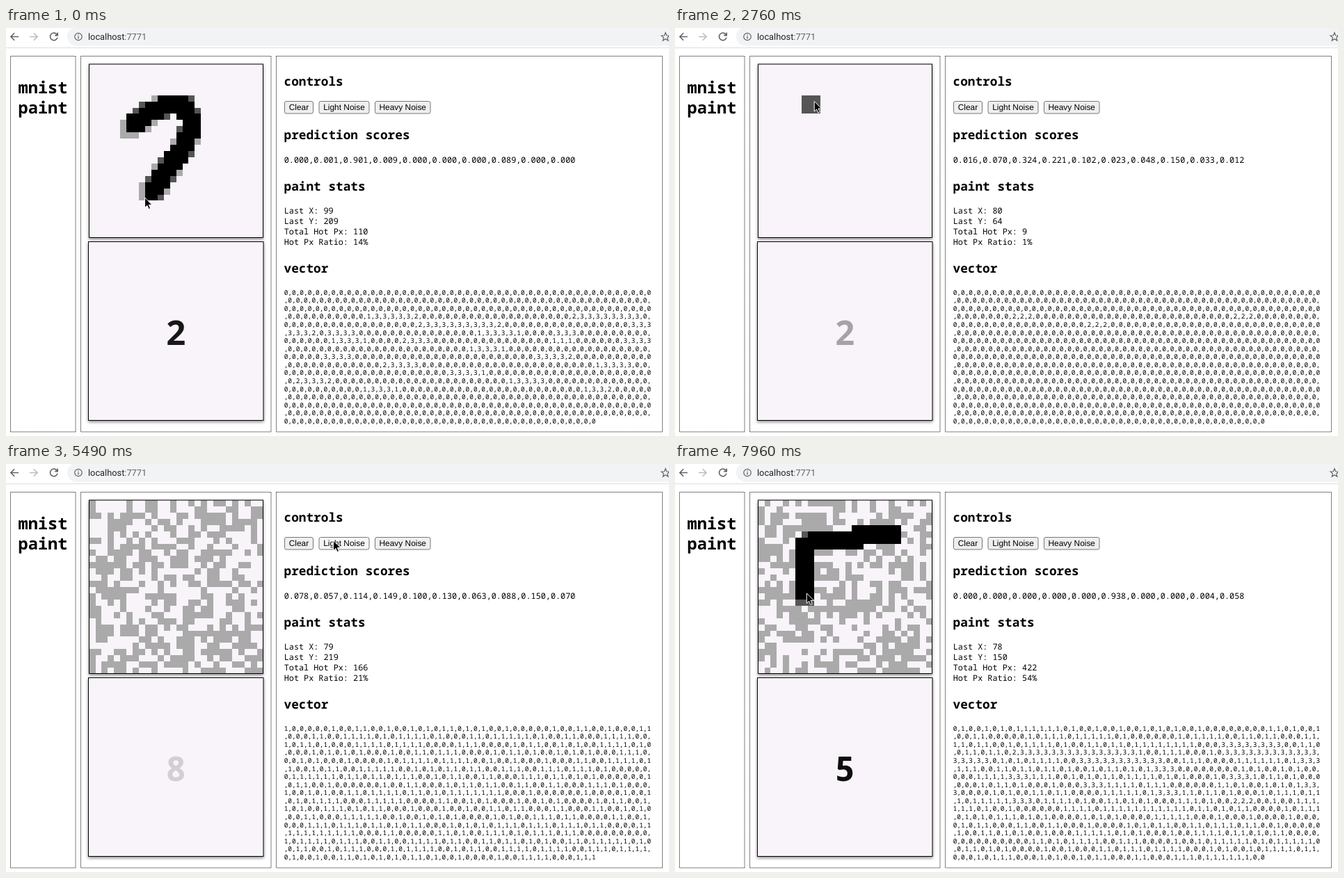
Recreate the animation shown at these times as an HTML page. Size 953 px wide and 587 px high, loop 8 s.

```html
<!DOCTYPE html>
<html lang="en">
<head>
<meta charset="utf-8">
<title>mnist paint</title>
<style>
html, body { margin: 0; width: 100%; height: 100%; overflow: hidden; background: #fff; }
svg { display: block; text-rendering: geometricPrecision; }
text { font-family: "Noto Sans Mono", monospace; font-size: 11.83px; }
.h1 { font-size: 23.67px; font-weight: 700; }
.h2 { font-size: 17.75px; font-weight: 700; }
.tiny { font-size: 9.46px; }
.digit { font-size: 49px; font-weight: 700; text-anchor: middle; }
.label { font: 11.9px "Liberation Sans", Arial, sans-serif; text-anchor: middle; }
.url { font: 12.8px Roboto, sans-serif; fill: #202124; }
.panel { fill: none; stroke: #000; stroke-dasharray: 1 1; }
.card { fill: #f8f4fa; filter: drop-shadow(0 2px 2px rgba(0, 0, 0, .45)); }
.icon { fill: none; stroke: #5f6368; stroke-width: 1.6; }
</style>
</head>
<body>
<svg id="stage" width="953" height="587" viewBox="0 0 953 587"></svg>
<script>
const LOOP = 8000, SIZE = 28, CELL = 250 / SIZE, LEFT = 119.6, TOP = 52, POINTER_LEAD = 70;
const SHADES = ['#aaa', '#555', '#000'];
const BUTTONS = [['Clear', 400, 42], ['Light Noise', 449.5, 73], ['Heavy Noise', 530, 80.5]];

// ---------- markup ----------
const stage = document.getElementById('stage');
const text = (x, y, str, cls = '', id = '') => `<text x="${x}" y="${y}" class="${cls}" id="${id}">${str}</text>`;
const rect = (x, y, w, h, attrs) => `<rect x="${x}" y="${y}" width="${w}" height="${h}" ${attrs}/>`;
const rows = (count, x, y, step, cls, id) =>
  Array.from({ length: count }, (_, i) => text(x, y + i * step, '', cls, id + i)).join('');
const star = Array.from({ length: 10 }, (_, i) => {
  const a = i * Math.PI / 5, r = i % 2 ? 2.8 : 6.3;
  return `${948 + r * Math.sin(a)},${13 - r * Math.cos(a)}`;
}).join(' ');

stage.innerHTML = `
  ${rect(88, -1, 900, 26.5, 'rx="13" fill="#f1f3f4"')}
  ${rect(0, 28, 953, 1, 'fill="#dcdee1"')}
  <path class="icon" d="M18 12.5H7M12.2 7.2L6.9 12.5L12.2 17.8"/>
  <path class="icon" style="stroke:#bbbdc0" d="M34 12.5H45M39.8 7.2L45.1 12.5L39.8 17.8"/>
  <path class="icon" d="M73.3 9.5A5.3 5.3 0 1 0 74 13.6M74.2 6.6V10.6H70.2"/>
  <circle class="icon" cx="104" cy="12.5" r="5.2" style="stroke-width:1.2"/>
  <path class="icon" style="stroke-width:1.3" d="M104 11.8V15.5M104 9.2V10.5"/>
  <text x="118" y="17" class="url">localhost<tspan fill="#5f6368">:7771</tspan></text>
  <polygon class="icon" style="stroke-width:1.2" points="${star}"/>
  ${[[6.5, 93.5], [107.5, 273.5], [388.5, 555]].map(([x, w]) => rect(x, 40.5, w, 540.5, 'class="panel"')).join('')}
  ${text(17.5, 94, 'mnist', 'h1')}${text(17.5, 123, 'paint', 'h1')}
  ${rect(119, 51.5, 251, 250.5, 'class="card"')}
  <g transform="translate(${LEFT} ${TOP}) scale(${CELL})" shape-rendering="crispEdges">
    ${SHADES.map((c, i) => `<path id="shade${i}" fill="${c}"/>`).join('')}
  </g>
  ${rect(119.5, 52, 250, 249.5, 'fill="none" stroke="#000"')}
  ${rect(118.5, 307.5, 251.5, 257, 'class="card" stroke="#000"')}
  ${text(244.3, 456, '', 'digit', 'digit')}
  ${text(399.5, 82.5, 'controls', 'h2')}
  ${BUTTONS.map(([name, x, w], i) => rect(x + .5, 105.5, w - 1, 17.5, `rx="2.5" stroke="#767676" id="button${i}"`)
    + text(x + w / 2, 118.2, name, 'label')).join('')}
  ${text(399.5, 160, 'prediction scores', 'h2')}
  ${text(399.7, 194.3, '', '', 'scores')}
  ${text(399.5, 233.5, 'paint stats', 'h2')}
  ${rows(4, 399.7, 267.4, 15, '', 'stat')}
  ${text(399.5, 351.5, 'vector', 'h2')}
  ${rows(17, 399.7, 383.8, 11.56, 'tiny', 'line')}
  <path id="pointer" d="M0 0V14.5L3.4 11.4L5.6 16.5L8 15.4L5.8 10.4H10.4Z" stroke="#fff"/>`;
const el = Object.fromEntries([...stage.querySelectorAll('[id]')].map(node => [node.id, node]));
const setText = (id, str) => { if (el[id].textContent !== str) el[id].textContent = str; };

// ---------- pointer track, in tenths of a cell ----------
const clamp = v => Math.min(1, Math.max(0, v));
const mix = (a, b, k) => a + (b - a) * k;
const legs = [];
let last = [65, 105], lastHot = 9;

// Goes on from the end of the leg before. A final "hot" pixel count means the brush is down.
function leg(start, end, points, hot) {
  const path = [last];
  for (const point of points.split(' ')) {
    const to = point.split(',').map(Number), from = last;
    const n = Math.ceil(Math.hypot(to[0] - from[0], to[1] - from[1]) / 4.5);
    for (let i = 1; i <= n; i++) path.push([0, 1].map(j => mix(from[j], to[j], i / n)));
    last = to;
  }
  legs.push({ start, end, path, hot: hot && [lastHot, hot] });
  lastHot = hot || lastHot;
}
const tap = (t, x, y, hot) => leg(t, t + 10, `${x + 1},${y} ${x},${y}`, hot);

// the 2
leg(-500, -10, '95,78 125,66 157,66 164,102 153,130 122,175 99,209', 110);
leg(30, 700, '85,218 85,228 110,205 175,184 212,164 218,153', 154);
leg(930, 1150, '345,98');
leg(1400, 1520, '345,68');
leg(2000, 2390, '91,45');
leg(2500, 2580, '80,64');
// the 3
tap(2585, 80, 64, 9);
leg(2800, 4080, '128,45 175,35 172,62 117,130 180,126 194,150 190,168 125,213 79,219', 166);
leg(4130, 4330, '108,306');
leg(4500, 4860, '316,98');
leg(4860, 5060, '345,68');
leg(5260, 5480, '393,65');
leg(6560, 7100, '215,58');
// the start of a 5
tap(7150, 215, 58, 371);
leg(7170, 7960, '165,55 155,64 78,70 78,150', 422);

const progress = ({ start, end }, t) => clamp((t - start) / (end - start));
function position(stroke, t) {
  const k = progress(stroke, t) * (stroke.path.length - 1), i = Math.floor(k);
  const a = stroke.path[i], b = stroke.path[i + 1] || a;
  return [mix(a[0], b[0], k - i), mix(a[1], b[1], k - i)];
}

// ---------- grid ----------
const CLEARS = [-999, 1790, 5150], NOISES = [5400, 5580, 5750, 6100, 6285];

function seededRandom(seed) {
  let s = seed * 7919;
  return () => {
    s = (s + 0x6D2B79F5) | 0;
    let v = Math.imul(s ^ (s >>> 15), 1 | s);
    v = (v + Math.imul(v ^ (v >>> 7), 61 | v)) ^ v;
    return ((v ^ (v >>> 14)) >>> 0) / 2 ** 32;
  };
}

function gridAt(t) {
  const since = Math.max(...CLEARS.concat(NOISES).filter(at => at <= t));
  const noisy = NOISES.includes(since), random = seededRandom(since);
  const grid = Array.from({ length: SIZE * SIZE }, () => noisy && random() < .475 ? 1 : 0);
  for (const stroke of legs) {
    if (!stroke.hot || stroke.start < since || stroke.start > t) continue;
    const reached = Math.floor(progress(stroke, t) * (stroke.path.length - 1));
    for (let i = 1; i <= reached; i++) {
      const [col, row] = stroke.path[i].map(v => Math.floor(v / 10));
      for (let d = 0; d < 9; d++) {
        const cell = (row - 1 + Math.floor(d / 3)) * SIZE + col - 1 + d % 3;
        grid[cell] = Math.min(3, grid[cell] + 1);
      }
    }
  }
  return grid;
}

// ---------- scores ----------
// [start, duration, digits from likely to unlikely, confidence in the first]
const GUESSES = [
  [-2, 1, '2731', .901],
  [90, 610, '27', .999],
  [1790, 1, '2374', .25],
  [2585, 10, '2374168509', .324],
  [2800, 250, '732', .82],
  [3050, 230, '327', .64],
  [3280, 520, '3', 1],
  [5150, 1, '2374', .25],
  [5400, 1, '8352470961', .15],
  [6100, 1, '8352470961', .158],
  [6285, 1, '2835749016', .148],
  [7150, 180, '795', .87],
  [7330, 630, '5987', .938],
];

// Each digit takes the same share of what is left; the leftover goes evenly to all but the first.
function spread(ranking, confidence) {
  const scores = [], order = new Set(ranking + '0123456789');
  const leftover = (1 - confidence) ** 10 / 9;
  let remaining = 1;
  for (const digit of order) {
    scores[digit] = remaining * confidence + (remaining < 1 ? leftover : 0);
    remaining *= 1 - confidence;
  }
  return scores;
}

function scoresAt(t) {
  let scores = Array(10).fill(0);
  for (const [start, duration, ranking, confidence] of GUESSES) {
    if (start > t) break;
    const goal = spread(ranking, confidence), k = clamp((t - start) / duration);
    scores = scores.map((s, i) => mix(s, goal[i], k));
  }
  return scores;
}

// ---------- drawing ----------
function draw(t) {
  const grid = gridAt(t);
  SHADES.forEach((_, i) => {
    const d = grid.map((v, n) => v === i + 1 ? `M${n % SIZE} ${Math.floor(n / SIZE)}h1v1h-1z` : '').join('');
    el['shade' + i].setAttribute('d', d);
  });
  grid.join(',').match(/.{1,93}/g).forEach((line, i) => setText('line' + i, line));

  const scores = scoresAt(t), best = Math.max(...scores);
  setText('scores', scores.map(s => s.toFixed(3)).join(','));
  setText('digit', String(scores.indexOf(best)));
  el.digit.setAttribute('opacity', best);

  const stroke = legs.findLast(l => l.hot && l.start <= t);
  const [lastX, lastY] = position(stroke, t).map(Math.floor);
  const hot = Math.round(mix(...stroke.hot, progress(stroke, t)));
  [`Last X: ${lastX}`, `Last Y: ${lastY}`, `Total Hot Px: ${hot}`,
    `Hot Px Ratio: ${Math.round(hot / SIZE / SIZE * 100)}%`].forEach((line, i) => setText('stat' + i, line));

  const ahead = t + POINTER_LEAD;
  const [px, py] = position(legs.findLast(l => l.start <= ahead), ahead);
  const x = LEFT + px * CELL / 10, y = TOP + py * CELL / 10;
  el.pointer.setAttribute('transform', `translate(${x} ${y})`);
  BUTTONS.forEach(([, left, width], i) => {
    const over = x > left && x < left + width && y > 105 && y < 123;
    el['button' + i].setAttribute('fill', over ? '#f6f6f6' : '#efefef');
  });
}

const begin = performance.now();
function tick() {
  draw((performance.now() - begin) % LOOP);
  requestAnimationFrame(tick);
}
tick();
</script>
</body>
</html>
```
